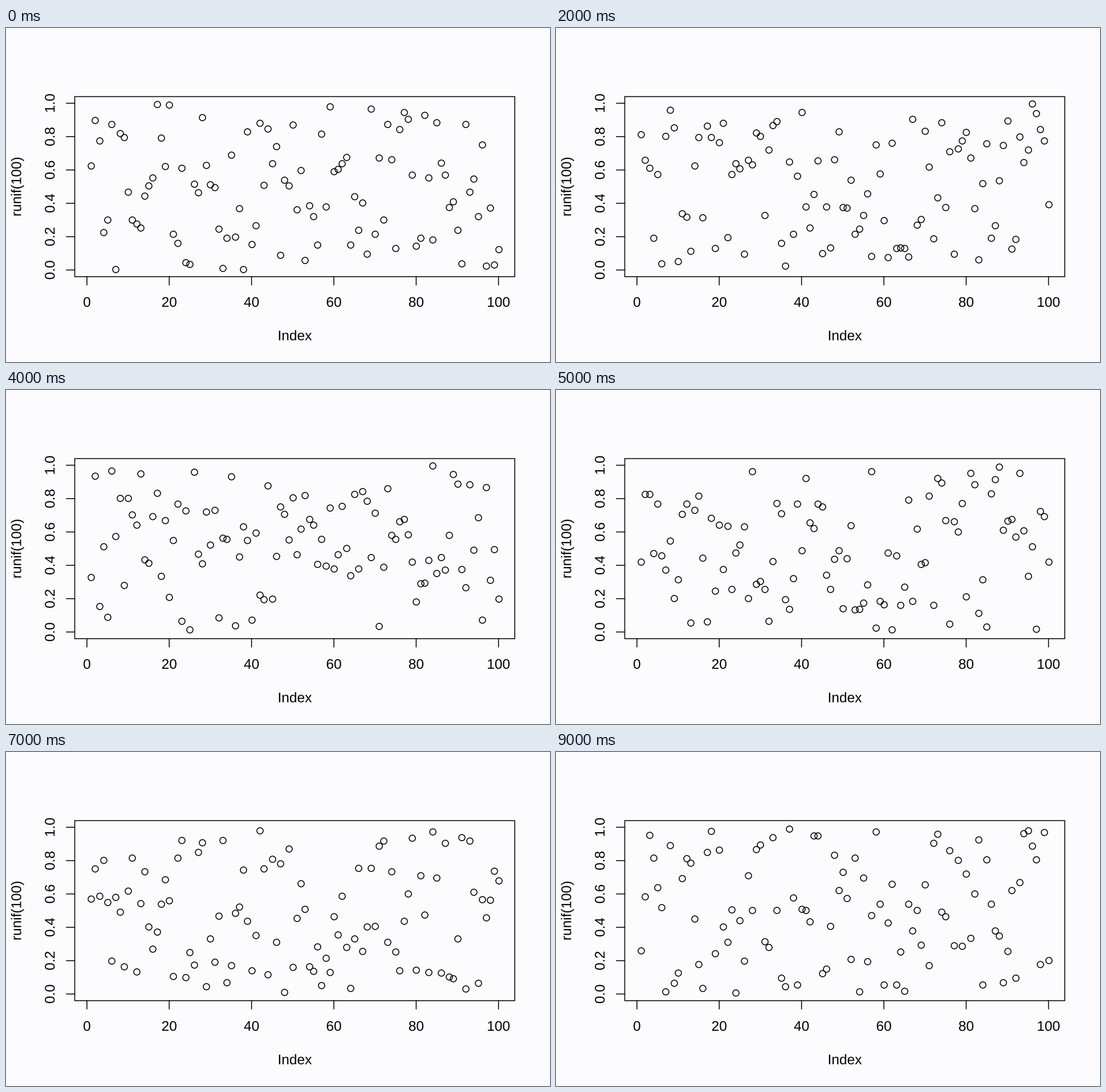
Animation, 954 px wide and 587 px high, one loop 10 s. Source, as a matplotlib script:

```python
import matplotlib.pyplot as plt
import numpy as np
from matplotlib.animation import FuncAnimation
from matplotlib.patches import PathPatch
from matplotlib.textpath import TextPath
from matplotlib.transforms import Affine2D

W, H, DPI = 954, 587, 128
PT = 72 / DPI                      # points per pixel
FRAMES, COUNT = 10, 100

EM = 24.5                          # text size in pixels
LINE = 1.2 * EM                    # margin line height
LEFT, TOP = 4.1 * LINE, 4.1 * LINE
RIGHT, BOTTOM = W - 2.1 * LINE, H - 5.1 * LINE
TICK = LINE / 2
STROKE = EM / 16 * PT
RADIUS = 0.225 * EM

plt.rcParams["font.family"] = "Liberation Sans"


def scale(v, lo, hi, a, b):
    """Map lo..hi onto a..b with 4 % padding at both ends."""
    pad = 0.04 * (hi - lo)
    return a + (v - lo + pad) / (hi - lo + 2 * pad) * (b - a)


def px(i):
    return scale(i, 1, COUNT, LEFT, RIGHT)


def py(v):
    return scale(v, 0, 1, BOTTOM, TOP)


fig = plt.figure(figsize=(W / DPI, H / DPI), dpi=DPI, facecolor="#fcfcfe")
ax = fig.add_axes([0, 0, 1, 1])
ax.set_xlim(0, W)
ax.set_ylim(H, 0)
ax.axis("off")


def stroke(xs, ys):
    ax.plot(xs, ys, color="black", lw=STROKE, snap=False,
            solid_capstyle="round", solid_joinstyle="round")


def glyphs(text):
    return TextPath((0, 0), text, size=EM)


def advance(text):
    """Width of the text with its side bearings."""
    return glyphs(text + "|").get_extents().x1 - glyphs("|").get_extents().x1


def label(x, y, text, angle=0):
    """Outline text with the middle of its baseline at x, y."""
    place = (Affine2D().translate(-advance(text) / 2, 0).rotate_deg(angle)
             .scale(1, -1).translate(x, y))
    ax.add_patch(PathPatch(place.transform_path(glyphs(text)),
                           fc="black", lw=0, snap=False))


# Box, ticks and labels
stroke([LEFT, RIGHT, RIGHT, LEFT, LEFT], [TOP, TOP, BOTTOM, BOTTOM, TOP])
for i in range(0, 101, 20):
    stroke([px(i)] * 2, [BOTTOM, BOTTOM + TICK])
    label(px(i), BOTTOM + 1.8 * LINE, str(i))
    v = i / 100
    stroke([LEFT - TICK, LEFT], [py(v)] * 2)
    label(LEFT - 1.2 * LINE, py(v), f"{v:.1f}", 90)
label((LEFT + RIGHT) / 2, BOTTOM + 3.8 * LINE, "Index")
label(LEFT - 3.2 * LINE, (TOP + BOTTOM) / 2, "runif(100)", 90)

# A fresh uniform sample for every second
samples = np.random.default_rng(7).uniform(size=(FRAMES, COUNT))
points, = ax.plot(px(np.arange(1, COUNT + 1)), py(samples[0]), "o",
                  ms=2 * RADIUS * PT, mfc="none", mec="black", mew=STROKE)


def update(k):
    points.set_ydata(py(samples[k]))
    return points,


anim = FuncAnimation(fig, update, frames=FRAMES, interval=1000,
                     repeat=True, repeat_delay=0)
plt.show()
```
